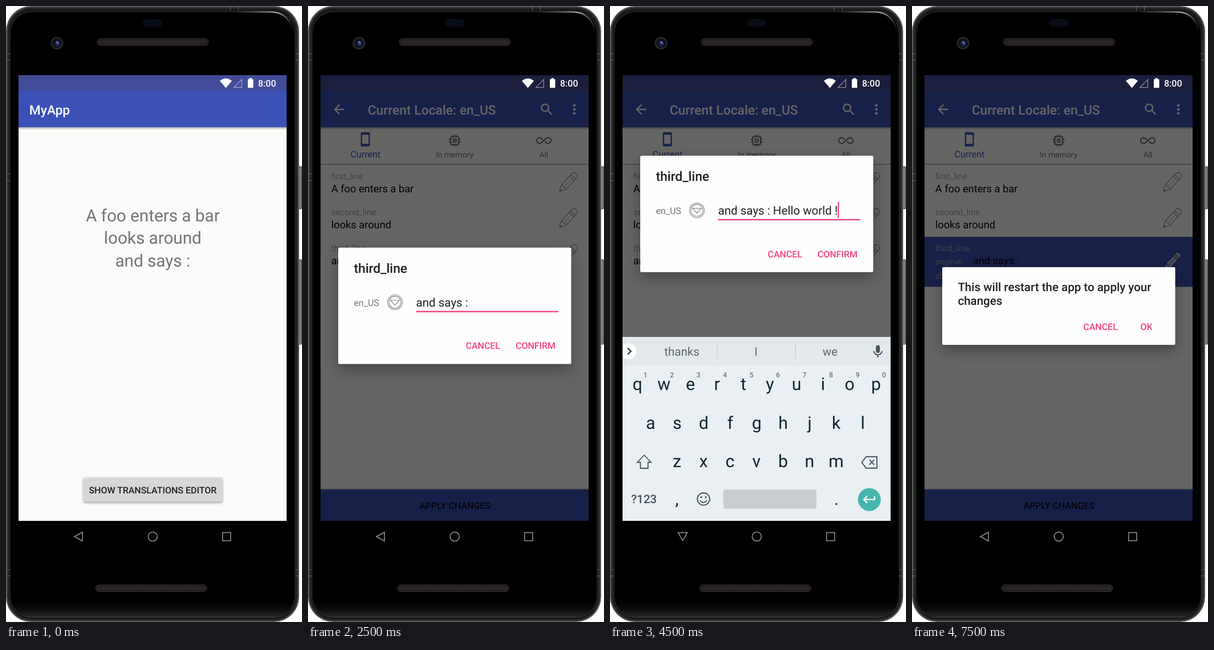
Animation, 519 px wide and 1078 px high, one loop 8 s. Source, as an HTML page with a canvas:

```html
<!DOCTYPE html>
<html lang="en">
<head>
<meta charset="utf-8">
<title>Translations editor</title>
<style>
html, body { margin: 0; width: 100%; height: 100%; overflow: hidden; background: #fff; }
canvas { display: block; width: 519px; height: 1078px; }
</style>
</head>
<body>
<canvas id="stage"></canvas>
<script>
const W = 519, H = 1078, LOOP = 8000;
const DP = 1.1414;
const L = 22, R = 492, TOP = 121, BOTTOM = 901, MID = 257.3;
const BLUE = '#3a51b7', PINK = '#f63e7d', PAPER = '#fefefc', INK = '#212121';

const canvas = document.getElementById('stage');
const c = canvas.getContext('2d');
const ratio = window.devicePixelRatio || 1;
canvas.width = W * ratio;
canvas.height = H * ratio;
c.scale(ratio, ratio);
if ('textRendering' in c) c.textRendering = 'geometricPrecision';

// Icons on a 24-unit grid
const ICON = {
  back: 'M20 12H5M12.7 4.7 5.4 12l7.3 7.3',
  search: 'M9.5 4a5.5 5.5 0 1 0 .01 0zM14 14l5.8 5.8',
  phone: 'M7 1h10a2 2 0 0 1 2 2v18a2 2 0 0 1-2 2H7a2 2 0 0 1-2-2V3a2 2 0 0 1 2-2zM7 5v14h10V5z',
  chip: 'M7 6h10l1 1v10l-1 1H7l-1-1V7zM10 10h4v4h-4zM10 3v3M14 3v3M10 18v3M14 18v3M3 10h3M3 14h3M18 10h3M18 14h3',
  loop: 'M10.3 10.5 8.5 8.9A4.38 4.38 0 1 0 8.5 15.1L15.5 8.9A4.38 4.38 0 1 1 15.5 15.1L13.7 13.5',
  mic: 'M12 14a3 3 0 0 0 3-3V5a3 3 0 0 0-6 0v6a3 3 0 0 0 3 3zm5.3-3a5.3 5.1 0 0 1-10.6 0H5c0 3.4 2.7 6.2 6 6.7V21h2v-3.3c3.3-.5 6-3.3 6-6.7z',
  enter: 'M20 7v5H4M9 6.5 3.5 12 9 17.5'
};

function rect(x, y, w, h, color) {
  c.fillStyle = color;
  c.fillRect(x, y, w, h);
}

function round(x, y, w, h, r, fill, line, lw = 1) {
  c.beginPath();
  c.roundRect(x, y, w, h, r);
  if (fill) { c.fillStyle = fill; c.fill(); }
  if (line) { c.strokeStyle = line; c.lineWidth = lw; c.stroke(); }
}

function circle(x, y, r, fill, line, lw = 1) {
  c.beginPath();
  c.arc(x, y, r, 0, 7);
  if (fill) { c.fillStyle = fill; c.fill(); }
  if (line) { c.strokeStyle = line; c.lineWidth = lw; c.stroke(); }
}

function stroke(d, color, lw) {
  c.strokeStyle = color;
  c.lineWidth = lw;
  c.stroke(new Path2D(d));
}

function fill(d, color) {
  c.fillStyle = color;
  c.fill(new Path2D(d), 'evenodd');
}

function gradient(x0, y0, x1, y1, ...stops) {
  const g = c.createLinearGradient(x0, y0, x1, y1);
  stops.forEach((s, i) => g.addColorStop(i / (stops.length - 1), s));
  return g;
}

function icon(d, x, y, color, lw) {
  c.save();
  c.translate(x - 12 * DP, y - 12 * DP);
  c.scale(DP, DP);
  if (lw) stroke(d, color, lw); else fill(d, color);
  c.restore();
}

// Size is in scaled points, like the app's own text
function text(s, x, y, sp, color, weight = 400, align = 'left') {
  c.font = `${weight} ${sp * DP}px Roboto, sans-serif`;
  c.textAlign = align;
  c.fillStyle = color;
  c.fillText(s, x, y);
}

function shade(y, h, alpha) {
  rect(L, y, R - L, h, gradient(0, y, 0, y + h, `rgba(0,0,0,${alpha})`, 'rgba(0,0,0,0)'));
}

function withShadow(blur, dy, alpha, draw) {
  c.save();
  c.shadowColor = `rgba(0,0,0,${alpha})`;
  c.shadowBlur = blur * ratio;
  c.shadowOffsetY = dy * ratio;
  draw();
  c.restore();
}

function speaker(x, y) {
  round(x, y, 195, 12, 6, '#211c1d', '#383233', 1);
  for (let i = 4; i < 192; i += 3) rect(x + i, y + 3, 1.2, 6, '#393233');
}

function phoneBody() {
  const side = gradient(512, 0, 519, 0, '#4c4f4e', '#8a8c8b', '#5d605f');
  round(511, 281, 8, 74, 2, side, '#3d403f');
  round(511, 444, 8, 148, 2, side, '#3d403f');

  // Rim: fades from a light outer edge into the dark face
  for (let i = 0; i < 8; i++) {
    const g = 18 + 84 * Math.exp(-i / 2.2);
    round(i, i, 514 - 2 * i, 1078 - 2 * i, 44 - i, `rgb(${g},${g + 3},${g + 1})`);
  }
  for (const y of [83, 94, 293, 305, 986, 997]) {
    rect(0, y, 7, 1, '#666a68');
    if (y < 200 || y > 900) rect(507, y, 7, 1, '#666a68');
  }
  for (const x of [393, 407]) rect(x, 0, 1, 8, '#666a68');
  const face = gradient(0, 1042, 0, 1070, '#000', '#0b0c0c', '#2a2d2c');
  round(7, 10, 500, 1060, 38, face, '#303332', 1);

  stroke('M400 10.5H465Q498 11 505 50',
    gradient(400, 0, 506, 40, 'rgba(190,195,193,0)', 'rgba(210,215,213,.35)', 'rgba(225,230,228,.8)', 'rgba(190,195,193,0)'), 2);

  round(240, 23, 34, 13, 6, '#080d17');
  circle(89.5, 65, 11, '#29292c');
  circle(89.5, 65, 8.5, '#101119');
  circle(90, 65.5, 4.5, '#1d2554');
  circle(91, 65, 2, '#4a5cae');
  circle(89.5, 63, 0.9, '#c5cce8');
  speaker(160, 57);
  speaker(157, 1013);
}

function navBar(typing) {
  const g = '#969896';
  stroke(typing ? 'M119.5 921.5H135.5L127.5 935.5z' : 'M134 920.8V936.2L120 928.5z', g, 1.5);
  circle(257.3, 928.5, 8, null, g, 1.5);
  c.strokeRect(379.7, 921.5, 14.2, 14.2);
}

function statusIcons() {
  fill('M375 131Q385.5 122.5 396 131L385.5 143.5z', '#fff');
  stroke('M413.4 128.5V142.6H399.8z', 'rgba(255,255,255,.5)', 1.3);
  round(424, 128, 9.5, 15.2, 1, '#fff');
  rect(426.5, 126.2, 4.5, 3, '#fff');
  text('8:00', 442, 141.2, 14, '#fff', 500);
}

function header(bg) {
  rect(L, TOP, R - L, BOTTOM - TOP, bg);
  rect(L, TOP, R - L, 28, '#434c99');
  rect(L, 148.5, R - L, 63.5, BLUE);
}

function home() {
  header('#fafcf9');
  shade(212, 5, 0.32);
  text('MyApp', 40.8, 189.6, 20, '#fff', 500);
  ['A foo enters a bar', 'looks around', 'and says :'].forEach((s, i) =>
    text(s, MID, 377 + i * 39.4, 26, '#737473', 400, 'center'));
  withShadow(4, 1.8, 0.4, () => round(136, 825.5, 243, 42, 2, '#d6d8d5'));
  text('SHOW TRANSLATIONS EDITOR', MID, 852.5, 14, '#202120', 500, 'center');
}

function pencil(y, bright) {
  const line = bright ? '#1d2545' : '#8f8f8e';
  c.save();
  c.translate(455.7, y);
  c.rotate(-Math.PI / 4 - 0.03);
  if (bright) c.scale(0.95, 0.95);
  c.lineJoin = 'round';
  const outline = 'M-21.5 0-11-5.8H17Q21.5-5 21.5 0T17 5.8H-11z';
  if (bright) fill(outline, '#b4bbe1');
  stroke(outline, line, 1.1);
  stroke('M-11-5.8Q-8.5-3-11 0Q-8.5 3-11 5.8M9-5.8Q11 0 9 5.8M13-5.8Q15 0 13 5.8', line, 1);
  stroke('M-9.8 0H9.8', line, 0.7);
  fill('M-21.5 0-17.5-2.3V2.3z', line);
  c.restore();
}

function row(y, key, value) {
  text(key, 40.8, y, 13, '#a3a3a2');
  text(value, 40.8, y + 23, 16, '#000');
  pencil(y + 6);
}

function editor(changed) {
  header(PAPER);
  shade(212, 4, 0.4);
  icon(ICON.back, 54.5, 181, '#fff', 2);
  text('Current Locale: en_US', 104.7, 189.6, 20, '#fff', 500);
  icon(ICON.search, 418.5, 181, '#fff', 2);
  for (const dy of [-7, 0, 7]) circle(467, 181 + dy, 2.3, '#fff');

  const grey = '#707070';
  icon(ICON.phone, 100.6, 233.2, BLUE);
  text('Current', 100.8, 265.3, 14, BLUE, 400, 'center');
  icon(ICON.chip, 257.2, 235.5, grey, 2);
  text('In memory', 257, 265.4, 12.2, grey, 400, 'center');
  icon(ICON.loop, 413.5, 235.5, grey, 2);
  text('All', 413.3, 265.4, 12.2, grey, 400, 'center');
  rect(L, 276.3, R - L, 1.4, '#a2a2a1');

  row(303, 'first_line', 'A foo enters a bar');
  row(366, 'second_line', 'looks around');
  if (changed) {
    const soft = '#a8a8aa';
    rect(L, 404, R - L, 87.5, BLUE);
    text('third_line', 40.8, 429, 13, soft);
    text('original:', 40.8, 452, 12, soft);
    text('changed:', 40.8, 477, 12, soft);
    text('and says :', 106.8, 452, 16, '#000');
    text('and says : Hello world !', 106.8, 477, 16, '#000');
    pencil(447.5, true);
  } else {
    row(429, 'third_line', 'and says :');
  }

  rect(L, 843, R - L, 3, gradient(0, 843, 0, 846, 'rgba(0,0,0,0)', 'rgba(0,0,0,.22)'));
  rect(L, 846, R - L, 55, BLUE);
  text('APPLY CHANGES', MID + 0.2, 879.7, 14, 'rgba(0,0,0,.87)', 500, 'center');
}

function dim() {
  rect(L, TOP, R - L, BOTTOM - TOP, 'rgba(0,0,0,.6)');
}

function panel(y, h) {
  c.save();
  c.beginPath();
  c.rect(L, TOP, R - L, BOTTOM - TOP);
  c.clip();
  withShadow(24, 10, 0.32, () => round(53, y, 408.5, h, 2.3, PAPER));
  c.restore();
}

function editDialog(y, value, caret) {
  panel(y, 203.7);
  text('third_line', 80.4, y + 44.4, 20, INK, 500);
  text('en_US', 80.4, y + 102, 14, '#757575');
  circle(152.5, y + 95.7, 13, null, '#858585', 1.1);
  circle(152.5, y + 95.7, 10.6, null, '#858585', 1.1);
  c.save();
  c.translate(152.5, y + 95.7);
  c.lineJoin = 'round';
  stroke('M-8-3.5H8L0 4.8z', '#858585', 1.2);
  c.restore();
  text(value, 189.6, y + 103.3, 18, INK);
  if (caret) rect(189.6 + c.measureText(value).width, y + 81, 2.2, 28, PINK);
  rect(189.5, y + 110.8, 249.5, 2.3, PINK);
  text('CANCEL', 276.5, y + 177.5, 14, PINK, 500);
  text('CONFIRM', 364, y + 177.5, 14, PINK, 500);
}

function restartDialog() {
  panel(457, 136);
  text('This will restart the app to apply your', 80.4, 499.3, 18, INK, 500);
  text('changes', 80.4, 523.3, 18, INK, 500);
  text('CANCEL', 300.3, 567.2, 14, PINK, 500);
  text('OK', 400.5, 567.2, 14, PINK, 500);
}

function keyboard(words) {
  const key = '#0f2530', soft = '#43535b';
  rect(L, 578.3, R - L, 1.5, '#50524f');
  rect(L, 579, R - L, 322, '#e9eff2');
  rect(L, 579, R - L, 50.5, '#e2e8eb');

  c.save();
  c.beginPath();
  c.rect(L, 579, 60, 50);
  c.clip();
  circle(32, 604.3, 14, '#fff');
  c.restore();
  stroke('M31 598.8 36.7 604.3 31 609.8', '#20292d', 2.2);
  words.forEach((w, i) => text(w, 126 + i * 130, 611.8, 18, '#5d686e', 400, 'center'));
  rect(187.5, 590, 1.2, 28, '#c3c9cc');
  rect(324.5, 590, 1.2, 28, '#c3c9cc');
  icon(ICON.mic, 469.7, 604.8, '#4a565c');

  const rows = [['qwertyuiop', 48], ['asdfghjkl', 71.2], ['zxcvbnm', 117.4]];
  rows.forEach(([letters, x], r) => [...letters].forEach((ch, i) =>
    text(ch, x + i * 46.5, 672.3 + r * 67.2, 26.5, key, 400, 'center')));
  for (let i = 0; i < 10; i++)
    text((i + 1) % 10, 62 + i * 46.5, 650, 11, '#6d777c', 500, 'center');

  stroke('M60 786 72 798.5H66.7V809H53.3V798.5H48z', soft, 1.8);
  stroke('M441.5 798.7 449 788.7H468V808.7H449zM454.7 794.2 463.3 802.8M463.3 794.2 454.7 802.8', soft, 1.9);
  text('?123', 59.5, 870.3, 18, soft, 500, 'center');
  text(',', 117.5, 873, 26.5, key, 400, 'center');
  text('.', 397, 873, 26.5, key, 400, 'center');
  circle(164, 862.8, 10.8, null, soft, 1.9);
  circle(160, 859.6, 1.7, soft);
  circle(168, 859.6, 1.7, soft);
  stroke('M158 865.5Q164 872.5 170 865.5', soft, 1.9);
  round(198.5, 846.5, 163.5, 33, 3, '#c8cdd0');
  circle(454.7, 863.7, 20, '#45b6ae');
  icon(ICON.enter, 454.7, 863.7, '#fff', 2);
}

function typing(value, words) {
  editor();
  dim();
  editDialog(262, value, true);
  keyboard(words);
}

const scenes = [
  { end: 500, draw: home },
  { end: 2500, draw: () => editor() },
  { end: 3500, draw() { editor(); dim(); editDialog(422.8, 'and says :'); } },
  { end: 4500, keys: true, draw: () => typing('and says :', ['me', 'be', 'in']) },
  { end: 5500, keys: true, draw: () => typing('and says : Hello world !', ['thanks', 'I', 'we']) },
  { end: 7500, draw: () => editor(true) },
  { end: LOOP, draw() { editor(true); dim(); restartDialog(); } }
];

let shown, start;
function tick(now) {
  start ??= now;
  const t = (now - start) % LOOP;
  const scene = scenes.find(s => t < s.end);
  if (scene !== shown) {
    shown = scene;
    rect(0, 0, W, H, '#fff');
    phoneBody();
    scene.draw();
    statusIcons();
    navBar(scene.keys);
  }
  requestAnimationFrame(tick);
}
requestAnimationFrame(tick);
</script>
</body>
</html>
```
